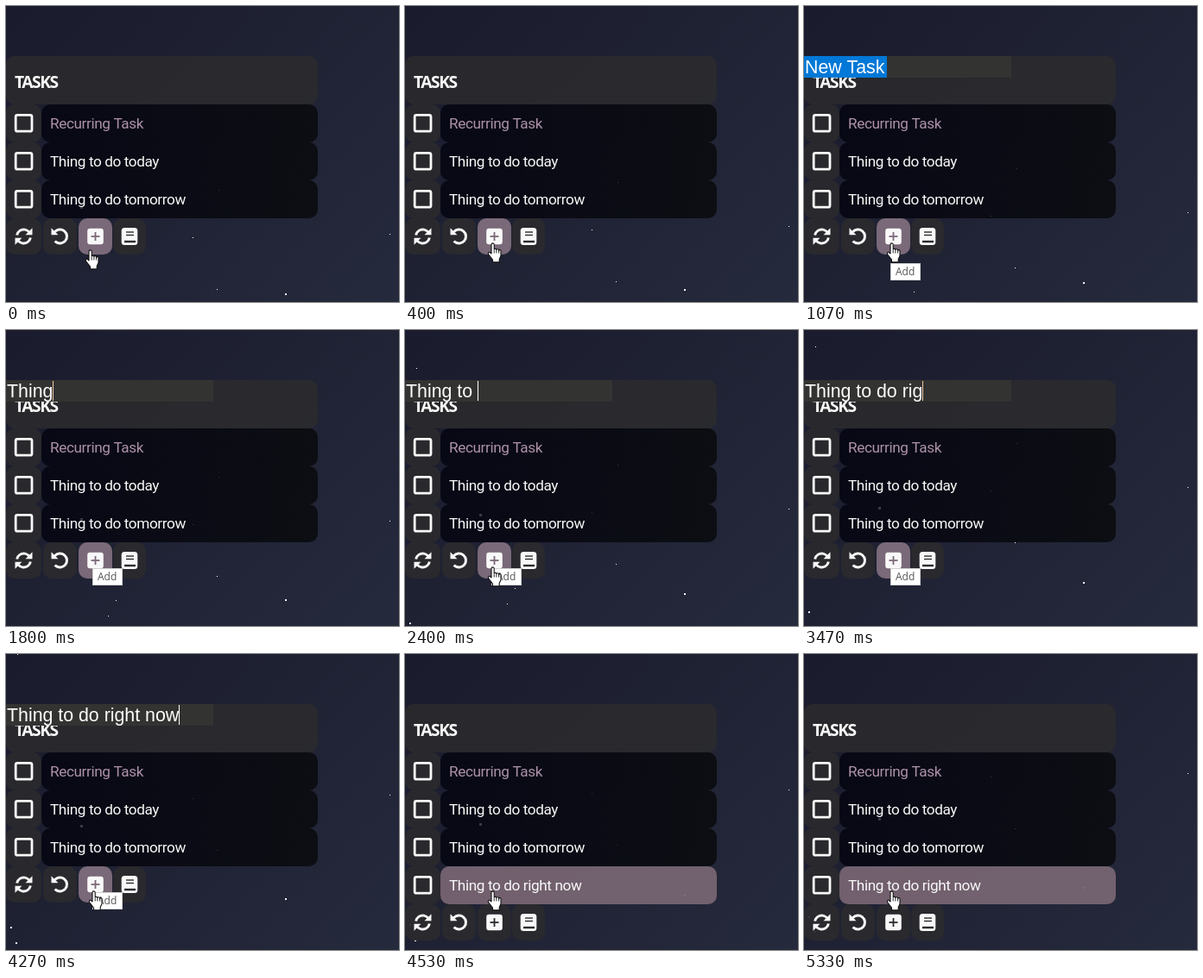
These frames come from a looping animation (455x343 px, 5.39 s). An HTML page with a canvas:

```html
<!DOCTYPE html>
<html lang="en">
<head>
<meta charset="utf-8">
<title>Task list</title>
<style>
  html, body { margin: 0; width: 100%; height: 100%; overflow: hidden; background: #1f2233; }
  canvas { display: block; }
</style>
</head>
<body>
<canvas id="stage" width="455" height="343"></canvas>
<script>
const W = 455, H = 343, LOOP = 5390, ROW = 44, PANEL_W = 361;
const ctx = document.getElementById('stage').getContext('2d');

const WHITE = '#f8f8f8', PANEL = 'rgba(43,43,46,.93)', HOVER = 'rgba(127,109,124,.95)';
const TASKS = ['Recurring Task', 'Thing to do today', 'Thing to do tomorrow'];
const NEW_TASK = 'Thing to do right now';

// Moments of the interaction, in ms
const OPEN = 430, TIP = 850, TYPE = 1190, COMMIT = 4530;
// Typing progress: [time, letters]
const KEYS = [[TYPE, 1], [1750, 5], [2330, 9], [3440, 15], [4200, 21]];
// The pointer hides for a while during bursts of typing
const HIDDEN = [[TYPE, 2000], [2900, 3750]];

// Upward drift in px/ms, by size: [x, y at start]
const STARS = [
  { size: 1, speed: .02364, at: [[13, 101], [246, 213], [216, 268], [444, 264], [244, 328], [127, 356], [118, 373.6]] },
  { size: 2, speed: .01182, at: [[323, 333], [5, 366.9], [11, 384.5]] },
  { size: 3, speed: .0079, at: [[86, 232]] }
];

const HAND = new Path2D('M4.5 13V2.5a1.6 1.6 0 0 1 3.2 0V8.2a1.4 1.4 0 0 1 2.7.5a1.4 1.4 0 0 1 2.7.8' +
  'a1.3 1.3 0 0 1 2.4 1.1V15.5L13.7 19.5V22.8H6V20L1 13.7Q.4 11 2.5 11.2Z');

function gradient(x0, y0, x1, y1, from, to) {
  const g = ctx.createLinearGradient(x0, y0, x1, y1);
  g.addColorStop(0, from);
  g.addColorStop(1, to);
  return g;
}
const SKY = gradient(28, -28, 427, 371, '#1a1b2c', '#252a3c');
const ROW_FILL = gradient(41, 0, PANEL_W, 0, 'rgba(2,2,14,.78)', 'rgba(7,8,10,.8)');

function box(x, y, w, h, r, fill) {
  ctx.fillStyle = fill;
  ctx.beginPath();
  ctx.roundRect(x, y, w, h, r);
  ctx.fill();
}

function text(str, x, y, font, fill, spacing = 0) {
  ctx.font = font;
  ctx.letterSpacing = spacing + 'px';
  ctx.fillStyle = fill;
  ctx.fillText(str, x, y);
}

function line(x0, y0, x1, y1, width, color) {
  ctx.strokeStyle = color;
  ctx.lineWidth = width;
  ctx.beginPath();
  ctx.moveTo(x0, y0);
  ctx.lineTo(x1, y1);
  ctx.stroke();
}

function at(x, y, draw) {
  ctx.save();
  ctx.translate(x, y);
  draw();
  ctx.restore();
}

// Open ring with an arrowhead at one end
function ring(start, end, head) {
  ctx.strokeStyle = ctx.fillStyle = WHITE;
  ctx.lineWidth = 3;
  ctx.beginPath();
  ctx.arc(0, 0, 8, start * Math.PI, end * Math.PI);
  ctx.stroke();
  ctx.beginPath();
  ctx.moveTo(head * 10, -9.8);
  ctx.lineTo(head * 10, -1.8);
  ctx.lineTo(head * 2, -1.8);
  ctx.fill();
}

function refreshIcon() {
  ring(1.06, 1.78, 1);
  ctx.rotate(Math.PI);
  ring(1.06, 1.78, 1);
}

function undoIcon() {
  ring(1.22, 2.76, -1);
}

function addIcon(hover) {
  const ink = hover ? '#7b6979' : '#2b2b30';
  box(-9.3, -9.3, 18.6, 18.6, 3, WHITE);
  line(-5, 0, 5, 0, 1.8, ink);
  line(0, -5, 0, 5, 1.8, ink);
}

function bookIcon() {
  box(-9.3, -10, 18.6, 20, 3.5, WHITE);
  line(-4, -5, 5, -5, 1.4, '#2b2b30');
  line(-4, -1.5, 5, -1.5, 1.4, '#2b2b30');
  line(-6, 6, 7, 6, 2.4, '#2b2b30');
}

const BUTTONS = [[0, 41, refreshIcon], [43, 39, undoIcon], [84, 39, addIcon], [124, 38, bookIcon]];

function sky(t) {
  ctx.fillStyle = SKY;
  ctx.fillRect(0, 0, W, H);
  ctx.fillStyle = '#fff';
  for (const { size, speed, at } of STARS)
    for (const [x, y] of at) ctx.fillRect(x, Math.round(y - speed * t), size, size);
}

function title() {
  box(0, 58, PANEL_W, 56, 10, PANEL);
  ctx.fontStretch = 'extra-condensed';
  ctx.letterSpacing = '0px';
  ctx.font = 'bold 100px "Noto Sans", sans-serif';
  const size = 5700 / ctx.measureText('TASKS').width;
  text('TASKS', 10, 95, `bold ${size}px "Noto Sans", sans-serif`, WHITE, -1.5);
  ctx.fontStretch = 'normal';
}

function row(label, i, hover) {
  const y = 114 + i * ROW;
  box(0, y, 41, ROW, 10, PANEL);
  box(41, y, PANEL_W - 41, ROW, 10, hover ? 'rgba(121,102,115,.93)' : ROW_FILL);
  ctx.strokeStyle = WHITE;
  ctx.lineWidth = 2.8;
  ctx.beginPath();
  ctx.roundRect(11.2, y + 12.4, 18.8, 18.8, 2);
  ctx.stroke();
  text(label, 51, y + 28, '17.2px Roboto, sans-serif', i ? WHITE : '#ad91a8', -.4);
}

function toolbar(y, hoverAdd) {
  for (const [x, w, icon] of BUTTONS) {
    const hover = hoverAdd && icon === addIcon;
    box(x, y, w, 42, 10, hover ? HOVER : PANEL);
    at(x + w / 2, y + 21, () => icon(hover));
  }
}

function typedCount(t) {
  for (let i = 1; i < KEYS.length; i++) {
    const [t0, n0] = KEYS[i - 1], [t1, n1] = KEYS[i];
    if (t < t1) return Math.floor(n0 + (n1 - n0) * (t - t0) / (t1 - t0));
  }
  return NEW_TASK.length;
}

function input(t) {
  const font = '21.33px "Liberation Sans", Arial, sans-serif';
  ctx.fillStyle = '#333332';
  ctx.fillRect(0, 58, 240, 25);
  if (t < TYPE) {
    ctx.fillStyle = '#0078d7';
    ctx.fillRect(0, 58, 96, 25);
    text('New Task', 1, 78, font, '#fff');
    return;
  }
  const typed = NEW_TASK.slice(0, typedCount(t));
  text(typed, 1, 78, font, '#fff');
  const caret = Math.round(ctx.measureText(typed).width + .6);
  ctx.fillStyle = typed.endsWith('g') ? '#f0c8a0' : '#fff';
  ctx.fillRect(caret, 59, 1, 23);
}

function tooltip(y) {
  ctx.fillStyle = '#fff';
  ctx.fillRect(100, y, 35, 20);
  ctx.strokeStyle = '#d0d0d0';
  ctx.lineWidth = 1;
  ctx.strokeRect(100.5, y + .5, 34, 19);
  text('Add', 106, y + 14, '12px "Open Sans", sans-serif', '#575757');
}

function pointer(t) {
  if (HIDDEN.some(([from, to]) => t >= from && t < to)) return;
  const p = Math.min(1, t / 350), ease = p * p * (3 - 2 * p);
  at(91.5 + 4 * ease, 282 - 8 * ease, () => {
    ctx.fillStyle = '#fff';
    ctx.strokeStyle = '#111';
    ctx.lineWidth = 1.1;
    ctx.lineJoin = 'round';
    ctx.fill(HAND);
    ctx.stroke(HAND);
    for (const x of [7.7, 10.4, 13.1]) line(x, 9, x, 12.5, .9, '#111');
  });
}

function draw(t) {
  const done = t >= COMMIT;
  sky(t);
  title();
  TASKS.forEach((label, i) => row(label, i, false));
  if (done) row(NEW_TASK, TASKS.length, true);
  toolbar(done ? 290 : 246, !done);
  if (t >= OPEN && !done) input(t);
  if (t >= TIP && !done) tooltip(t < TYPE ? 298 : 276);
  pointer(t);
}

const start = performance.now();
function tick() {
  draw((performance.now() - start) % LOOP);
  requestAnimationFrame(tick);
}
tick();
</script>
</body>
</html>
```
